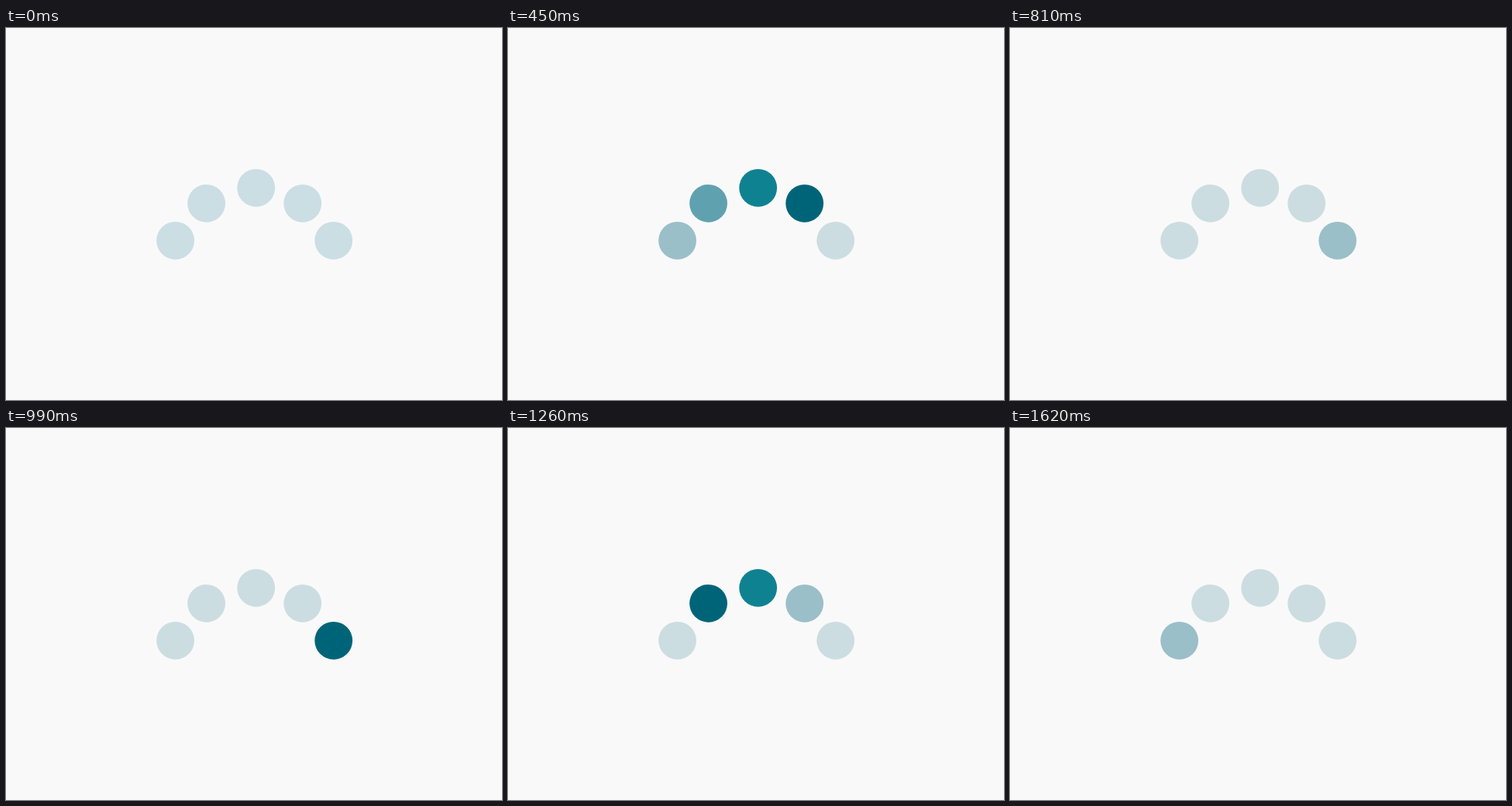
Animation, 640 px wide and 480 px high, one loop 1.71 s. Source, as an HTML page:

```html
<!DOCTYPE html>
<html lang="en">
<head>
<meta charset="utf-8">
<title>Loading dots</title>
<style>
  html, body { margin: 0; width: 100%; height: 100%; overflow: hidden; background: #f9f9f9; }
  svg { display: block; width: 100vw; height: 100vh; }
</style>
</head>
<body>
<svg viewBox="0 0 640 480">
  <circle cx="218.6" cy="274.3" r="24.4"/>
  <circle cx="258.6" cy="226.3" r="24.4"/>
  <circle cx="322.7" cy="206.3" r="24.4"/>
  <circle cx="382.7" cy="226.3" r="24.4"/>
  <circle cx="422.7" cy="274.3" r="24.4"/>
</svg>
<script>
  const STEP = 90, STEPS = 19, OUT = 2, BACK = 11;
  const REST = '#cadee4', PALE = '#ccdde1';
  const TRAIL = ['#006478', '#0f8292', '#60a1b0', '#9abfc8'];
  const dots = [...document.querySelectorAll('circle')];
  const last = dots.length - 1;

  // Steps since the sweep passed dot i; the way back fades one shade sooner.
  function shade(i, step) {
    if (step < BACK) return step - OUT - i;
    const age = step - BACK - (last - i);
    return age >= 2 && i > 0 ? age + 1 : age;
  }

  function draw(time) {
    const step = Math.floor(time / STEP) % STEPS;
    const idle = step < OUT ? REST : PALE;
    dots.forEach((dot, i) => dot.setAttribute('fill', TRAIL[shade(i, step)] || idle));
  }

  function tick() {
    draw(performance.now() - start);
    requestAnimationFrame(tick);
  }

  const start = performance.now();
  tick();
</script>
</body>
</html>
```
